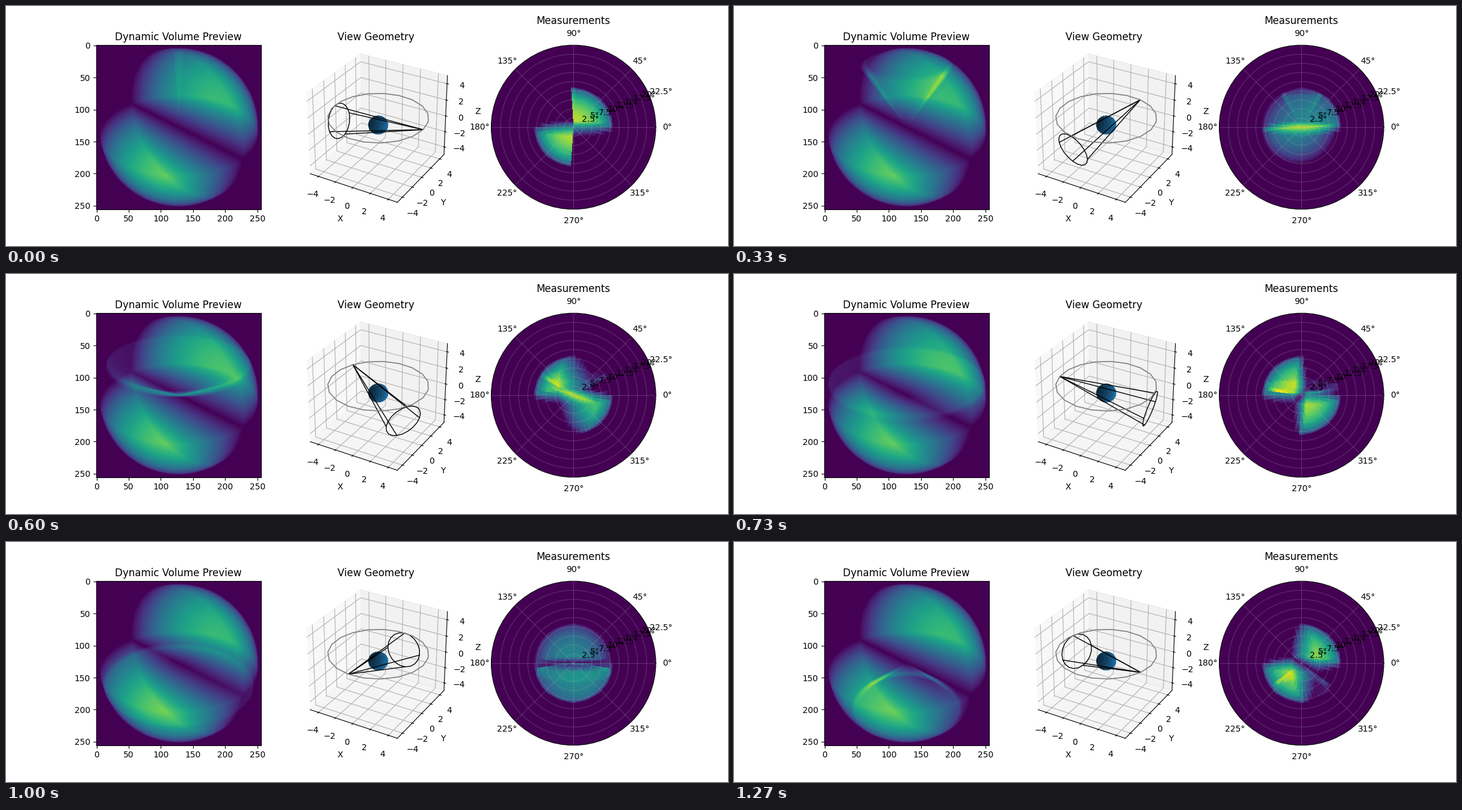
Recreate the animation shown at these times as a matplotlib script. Size 1200 px wide and 400 px high, loop 1340 ms.

```python
import numpy as np
import matplotlib.pyplot as plt
from matplotlib.animation import FuncAnimation
from mpl_toolkits.mplot3d.art3d import Line3DCollection

FRAMES = 20
PREVIEW = 256      # preview pixels per side
BINS = 50          # detector bins, both radial and angular
CELLS = 50         # elevation cells of the volume
RADIUS, HEIGHT = 5, 1
FOV = 22.5


def camera_axes(pos):
    """Unit look, right and up vectors of a camera aimed at the origin."""
    look = -pos / np.linalg.norm(pos)
    right = np.cross(look, [0, 0, 1])
    right /= np.linalg.norm(right)
    return look, right, np.cross(right, look)


def make_rays(pos, u, v):
    look, right, up = camera_axes(pos)
    rays = look + u.reshape(-1, 1) * right + v.reshape(-1, 1) * up
    return rays / np.linalg.norm(rays, axis=1, keepdims=True)


def integrate(pos, rays, steps):
    """Line integrals of the two lit quarters and of every elevation cell."""
    b = rays @ pos
    half = np.sqrt(np.maximum(b**2 - (pos @ pos - 1), 0))
    hit = np.flatnonzero(half > 0)
    d, half, start = rays[hit], half[hit], -b[hit] - half[hit]
    ds = 2 * half / steps
    lit = np.zeros(len(hit))
    cones = np.zeros((CELLS, len(hit)))
    column = np.arange(len(hit))
    for i in range(steps):
        s = start + (i + 0.5) * ds
        x, y, z = (pos[j] + s * d[:, j] for j in range(3))
        lit += ds * ((y > -1e-9) == (z > 0))
        polar = np.arccos(np.clip(z / np.sqrt(x*x + y*y + z*z), -1, 1))
        cell = np.minimum((polar / np.pi * CELLS).astype(int), CELLS - 1)
        cones[cell, column] += ds
    return hit, lit, cones


def image_at(k, size, hit, lit, cones):
    """Static volume plus the cone shell that opens with time."""
    image = np.zeros(size)
    image[hit] = lit + cones[2 * k]
    return image


def render_preview():
    elev, azim, dist = np.radians(30), np.radians(-45), 4
    pos = dist * np.array([np.cos(elev) * np.cos(azim),
                           np.cos(elev) * np.sin(azim), np.sin(elev)])
    edge = (np.arange(PREVIEW) + 0.5) / PREVIEW * 2 - 1
    u, v = np.meshgrid(edge, -edge)
    scale = np.tan(np.radians(15))
    parts = integrate(pos, make_rays(pos, u * scale, v * scale), 400)
    return [image_at(k, PREVIEW**2, *parts).reshape(PREVIEW, PREVIEW)
            for k in range(FRAMES)]


def render_measurement(k):
    mid = (np.arange(BINS) + 0.5) / BINS
    angle, r = np.meshgrid(mid * 2 * np.pi, mid * np.tan(np.radians(FOV)))
    pos = orbit[k]
    rays = make_rays(pos, r * np.cos(angle), r * np.sin(angle))
    return image_at(k, BINS**2, *integrate(pos, rays, 400)).reshape(BINS, BINS)


def cone_segments(k):
    """Circle at the end of the view cone and four rays leading to it."""
    pos = orbit[k]
    look, right, up = camera_axes(pos)
    length, spread = 10, np.radians(FOV / 2)
    a = turn[:, None]
    circle = pos + length * (np.cos(spread) * look + np.sin(spread)
                             * (np.cos(a) * right + np.sin(a) * up))
    # every segment needs the same number of points
    return [circle] + [np.linspace(pos, p, len(circle)) for p in circle[:-1:5]]


turn = np.linspace(0, 2 * np.pi, FRAMES)
orbit = np.column_stack([RADIUS * np.cos(turn), RADIUS * np.sin(turn),
                         np.full(FRAMES, HEIGHT)])
previews = render_preview()
measurements = [render_measurement(k) for k in range(FRAMES)]

fig = plt.figure(figsize=(12, 4), dpi=100)

# Volume preview
ax = fig.add_subplot(131)
ax.set_title("Dynamic Volume Preview")
picture = ax.imshow(previews[0], vmin=0, vmax=np.max(previews))

# View geometry
ax = fig.add_subplot(132, projection="3d")
ax.set_title("View Geometry")
lon, lat = np.meshgrid(np.linspace(0, 2 * np.pi, 20), np.linspace(0, np.pi, 20))
ax.plot_surface(np.sin(lat) * np.cos(lon), np.sin(lat) * np.sin(lon), np.cos(lat))
path = Line3DCollection([orbit], colors="gray", linewidths=1.2)
cone = Line3DCollection(cone_segments(0), colors="black", linewidths=1.0)
ax.add_collection3d(path)
ax.add_collection3d(cone)
ax.set(xlim=(-5, 5), ylim=(-5, 5), zlim=(-5, 5),
       xlabel="X", ylabel="Y", zlabel="Z")
ticks = [-4, -2, 0, 2, 4]
ax.set(xticks=ticks, yticks=ticks, zticks=ticks)
ax.set_box_aspect((1, 1, 0.92))

# Detector readings
ax = fig.add_subplot(133, projection="polar")
ax.set_title("Measurements")
mesh = ax.pcolormesh(np.linspace(0, 2 * np.pi, BINS + 1),
                     np.linspace(0, FOV, BINS + 1), measurements[0],
                     vmin=0, vmax=np.max(measurements))
ax.set_ylim(0, FOV)
ax.set_yticks(np.arange(2.5, FOV + 1, 2.5))
ax.yaxis.set_major_formatter(lambda r, _: f"{r:g}°")
ax.grid(True, alpha=0.25)


def update(k):
    picture.set_data(previews[k])
    cone.set_segments(cone_segments(k))
    mesh.set_array(measurements[k])
    return picture, cone, mesh


anim = FuncAnimation(fig, update, frames=FRAMES, interval=67,
                     repeat=True, repeat_delay=0, blit=False)
plt.show()
```
